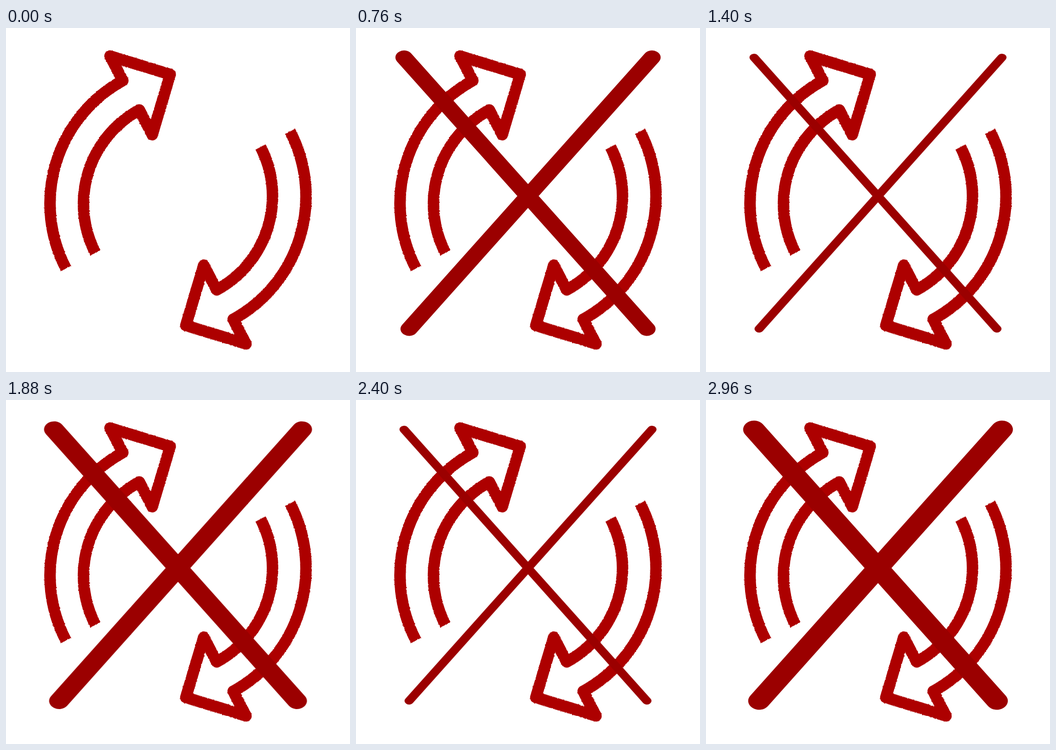
Write an HTML page that moves like this. It is 748 by 748 pixels and loops after 3 s.

```html
<!DOCTYPE html>
<html lang="en">
<head>
<meta charset="utf-8">
<title>Crossed-out cycle arrows</title>
<style>
  html, body { margin: 0; width: 100%; height: 100%; overflow: hidden; background: #fff; }
  svg { display: block; width: 100vw; height: 100vh; }
</style>
</head>
<body>
<svg viewBox="0 0 748 748" fill="none">
  <defs>
    <!-- slightly frayed edges -->
    <filter id="rough" filterUnits="userSpaceOnUse" x="0" y="0" width="748" height="748" color-interpolation-filters="sRGB">
      <feTurbulence type="fractalNoise" baseFrequency=".3" numOctaves="1" seed="4" result="noise"/>
      <feDisplacementMap in="SourceGraphic" in2="noise" scale="3" xChannelSelector="R" yChannelSelector="G"/>
    </filter>
    <path id="arrow" d="M130.4 523A305 305 0 0 1 254 114.3L226.2 61 357 101 318 232 290 178.3A232 232 0 0 0 194.5 489"/>
  </defs>
  <g stroke="#ad0000" stroke-width="25" stroke-linejoin="round" filter="url(#rough)">
    <use href="#arrow"/>
    <use href="#arrow" transform="rotate(180 374 373.9)"/>
  </g>
  <!-- the cross is stretched sideways, so its round ends are ellipses -->
  <path id="cross" d="M-217.9 64L209 654.3M217.9 64L-209 654.3" transform="translate(374) scale(1.237 1)"
        stroke="#9b0000" stroke-linecap="round" visibility="hidden"/>
</svg>
<script>
  const LOOP = 3000, STEP = 40, MAX_WIDTH = 38.4;
  const cross = document.getElementById('cross');
  // [time, relative width]: three swells with a quick drop between them
  const keys = [[0, 0], [960, 1], [1040, 1 / 24], [1960, 1], [2040, 1 / 24], [2960, 1]];

  function widthAt(t) {
    const i = Math.max(1, keys.findIndex(k => k[0] >= t));
    const [t0, w0] = keys[i - 1], [t1, w1] = keys[i];
    return MAX_WIDTH * (w0 + (w1 - w0) * (t - t0) / (t1 - t0));
  }

  const start = performance.now();
  function draw() {
    const elapsed = (performance.now() - start) % LOOP;
    const width = widthAt(Math.floor(elapsed / STEP) * STEP);
    cross.setAttribute('stroke-width', width);
    cross.setAttribute('visibility', width > 0 ? 'visible' : 'hidden');
    requestAnimationFrame(draw);
  }
  draw();
</script>
</body>
</html>
```
